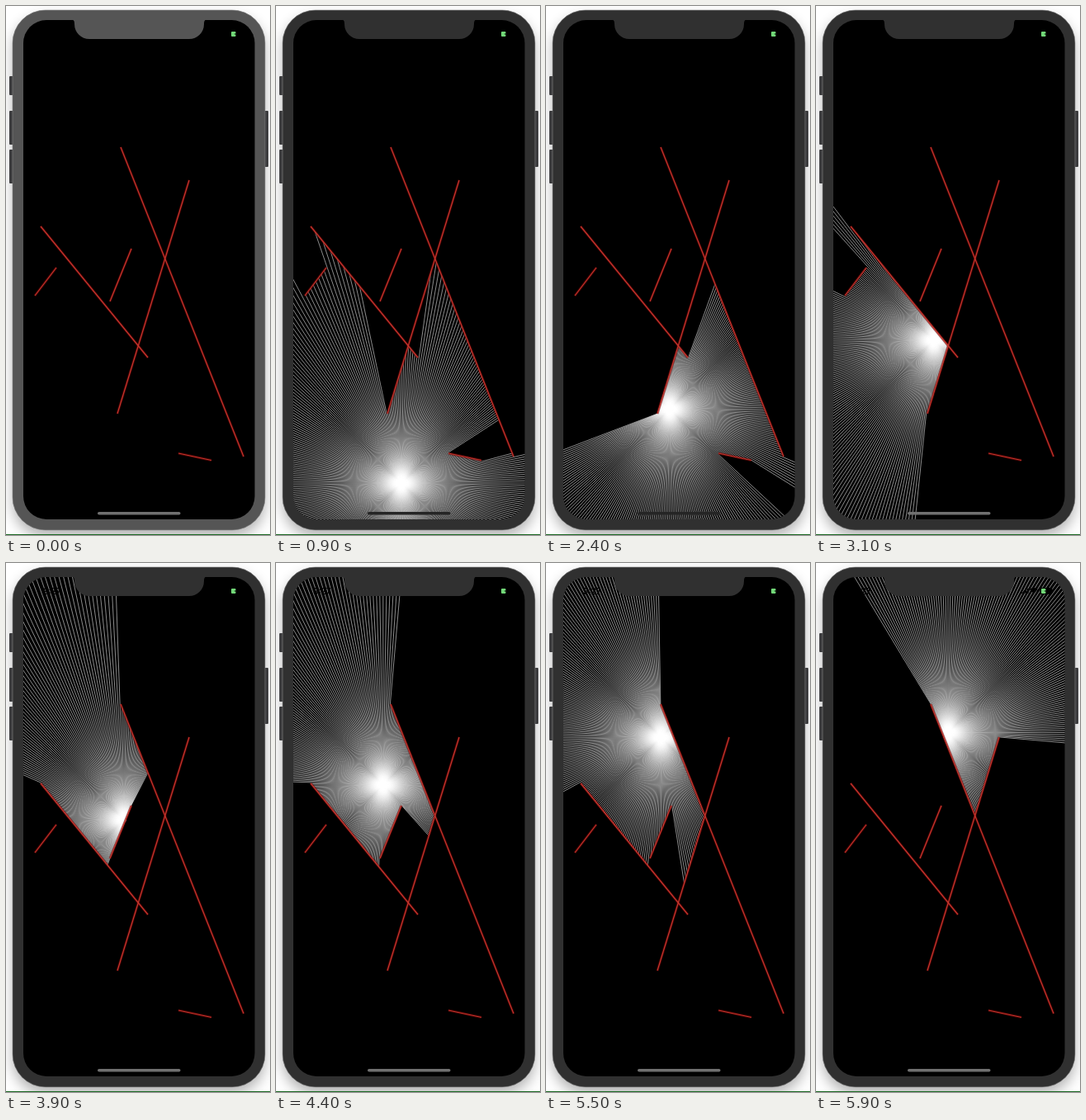
Animation, 320 px wide and 641 px high, one loop 6000 ms. Source, as an HTML page with a canvas:

```html
<!DOCTYPE html>
<html lang="en">
<head>
<meta charset="utf-8">
<title>Light rays</title>
<style>
  html, body { margin: 0; width: 100%; height: 100%; overflow: hidden; background: #fff; }
  canvas { display: block; width: 320px; height: 641px; }
</style>
</head>
<body>
<canvas id="stage" width="320" height="641"></canvas>
<script>
const ctx = document.getElementById('stage').getContext('2d');
const LOOP = 6000, STEP = 100, LIGHT_ON = 700, HOME_DIMS_UNTIL = 2800;

// Walls as x1, y1, x2, y2
const walls = [
  [139, 171, 288, 546],
  [222, 211, 135, 494],
  [42, 267, 172, 426],
  [61, 317, 35, 351],
  [152, 294, 126, 358],
  [209, 542, 249, 550.5]
];

// Light path as time, x, y
const path = [
  [700, 151, 586], [900, 152, 578], [1800, 155, 542], [2750, 146.8, 457],
  [3100, 143, 405], [3450, 143, 393], [3900, 143, 311],
  [5000, 114, 218.5], [5900, 160, 205.5]
];

function lightAt(t) {
  const i = Math.max(1, path.findIndex(p => p[0] >= t));
  const [t0, x0, y0] = path[i - 1], [t1, x1, y1] = path[i];
  const k = (t - t0) / (t1 - t0);
  return [x0 + (x1 - x0) * k, y0 + (y1 - y0) * k];
}

function box(x, y, w, h, r, fill) {
  ctx.beginPath();
  ctx.roundRect(x, y, w, h, r);
  ctx.fillStyle = fill;
  ctx.fill();
}

function line(x1, y1, x2, y2) {
  ctx.beginPath();
  ctx.moveTo(x1, y1);
  ctx.lineTo(x2, y2);
  ctx.stroke();
}

// Distance along a ray to the nearest wall
function reach(x, y, dx, dy) {
  let best = 900;
  for (const [x1, y1, x2, y2] of walls) {
    const ex = x2 - x1, ey = y2 - y1, det = dx * ey - dy * ex;
    if (!det) continue;
    const d = ((x1 - x) * ey - (y1 - y) * ex) / det;
    const u = ((x1 - x) * dy - (y1 - y) * dx) / det;
    if (d > 0 && u >= 0 && u <= 1) best = Math.min(best, d);
  }
  return best;
}

function drawRays(x, y) {
  ctx.strokeStyle = '#fff';
  ctx.lineWidth = 0.55;
  for (let deg = 0; deg < 360; deg++) {
    const a = deg * Math.PI / 180, dx = Math.cos(a), dy = Math.sin(a);
    const d = reach(x, y, dx, dy);
    line(x, y, x + dx * d, y + dy * d);
  }
  ctx.beginPath();
  ctx.arc(x, y, 3, 0, 7);
  ctx.fillStyle = '#fff';
  ctx.fill();
}

function drawWalls() {
  for (const [color, width] of [['rgba(110,0,0,.6)', 3], ['#c4372f', 1.2]]) {
    ctx.strokeStyle = color;
    ctx.lineWidth = width;
    walls.forEach(w => line(...w));
  }
}

function drawBody(color) {
  ctx.fillStyle = '#fff';
  ctx.fillRect(0, 0, 320, 641);
  ctx.save();
  ctx.shadowColor = 'rgba(0,0,0,.3)';
  ctx.shadowBlur = 16;
  ctx.shadowOffsetY = 8;
  box(8, 5, 306, 630, 40, color);
  ctx.restore();
  for (const [x, y, h] of [[4, 85, 23], [4, 127, 41], [4, 174, 41], [313, 127, 68]])
    box(x, y, 5, h, 1, '#3c3c3e');
  box(8, 5, 306, 630, 40, color);
  ctx.strokeStyle = 'rgba(130,130,130,.6)';
  ctx.lineWidth = 1;
  ctx.stroke();
  ctx.fillStyle = '#1c6a24';
  ctx.fillRect(0, 640, 320, 1);
}

function drawNotch(color) {
  ctx.beginPath();
  ctx.moveTo(78, 16);
  ctx.quadraticCurveTo(83, 16, 83, 21);
  ctx.arcTo(83, 40, 101, 40, 18);
  ctx.arcTo(240, 40, 240, 22, 18);
  ctx.lineTo(240, 21);
  ctx.quadraticCurveTo(240, 16, 245, 16);
  ctx.fillStyle = color;
  ctx.fill();
}

// Black status items show only against the light
function drawStatus() {
  ctx.fillStyle = '#000';
  ctx.font = '600 10px Inter, "Liberation Sans", sans-serif';
  ctx.fillText('9:27', 45, 38);
  for (let i = 0; i < 4; i++) ctx.fillRect(249 + i * 2.3, 35 - i * 1.3, 1.6, 2 + i * 1.3);
  ctx.beginPath();
  ctx.moveTo(264, 37);
  ctx.arc(264, 37, 7, -2.35, -0.79);
  ctx.fill();
  box(271.5, 30, 15, 8, 2, '#000');
  box(273, 31, 5.5, 6, 1, '#72d878');
  ctx.fillStyle = '#000';
  ctx.fillRect(277, 33.5, 2, 1);
}

function draw(t) {
  const lit = t >= LIGHT_ON, color = lit ? '#303030' : '#555';
  drawBody(color);
  box(21, 17, 280.5, 605, 28, '#000');
  ctx.save();
  ctx.clip();
  if (lit) drawRays(...lightAt(t));
  drawStatus();
  drawWalls();
  box(111, 613, 100.5, 3.5, 1.75, lit && t < HOME_DIMS_UNTIL ? '#252525' : '#707070');
  ctx.restore();
  drawNotch(color);
}

let shown = -1;
function tick() {
  const t = Math.floor(performance.now() % LOOP / STEP) * STEP;
  if (t !== shown) draw(shown = t);
  requestAnimationFrame(tick);
}
tick();
</script>
</body>
</html>
```
